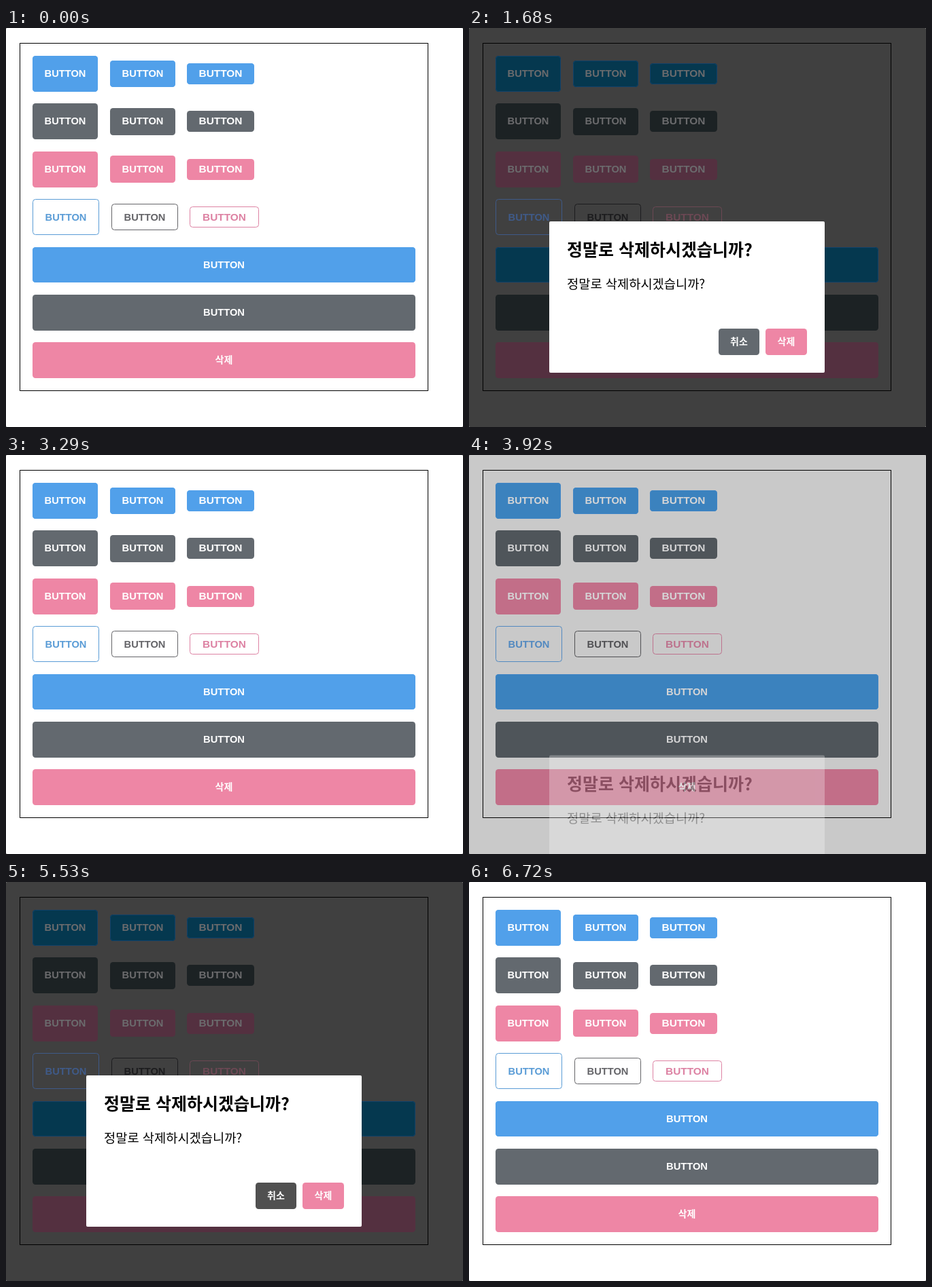
An HTML page for the animation above (6790 ms loop, 672 by 588 pixels).

```html
<!DOCTYPE html>
<html lang="ko">
<head>
<meta charset="utf-8">
<title>Buttons and dialog</title>
<style>
  html, body { margin: 0; width: 100%; height: 100%; overflow: hidden; background: #888; }
  svg { display: block; width: 672px; height: 588px; }
  text { font: bold 14.67px "Liberation Sans", Arial, sans-serif; text-anchor: middle; }
  .ko { font: bold 14px "Noto Sans CJK KR", "Noto Sans CJK", sans-serif; }
  .title { font-size: 25px; text-anchor: start; }
  .body { font-size: 18.7px; font-weight: 400; text-anchor: start; }
</style>
</head>
<body>
<svg id="stage" viewBox="0 0 672 588"></svg>
<script>
const LOOP = 6790, TICK = 70, SLIDE = 220;

// [normal, dimmed]
const WHITE = ['#ffffff', '#404040'];
const LABEL = ['#ffffff', '#6b6b6d'];
const FILL = {
  blue: ['#51a0ea', '#05384f'],
  gray: ['#63696f', '#1c2224'],
  pink: ['#ee86a5', '#543040'],
};
const EDGE = { ...FILL, blue: ['#51a0ea', '#10416a'] };
const LINE = {
  blue: ['#5a9cd6', '#3f5a88'],
  gray: ['#646468', '#1c1c1e'],
  pink: ['#dd82a3', '#6c4854'],
};
const PINK = { idle: '#ee86a5', hover: '#f4a9c3', down: '#ea6390' };
const GRAY = { idle: '#63696f', hover: '#7f868e', down: '#505050' };

// Dialog fades: [start, duration, opening]
const FADES = [[1560, 120, 1], [3180, 110, 0], [3900, 130, 1], [5580, 120, 0]];
// Pointer states: [time, state]
const REMOVE = [[0, 'idle'], [980, 'hover'], [1540, 'down'], [1610, 'idle'], [3500, 'hover'],
  [3780, 'down'], [3920, 'idle'], [5880, 'hover'], [5950, 'idle']];
const CANCEL = [[0, 'idle'], [2030, 'hover'], [2170, 'idle'], [5040, 'hover'], [5530, 'down']];
const CONFIRM = [[0, 'idle'], [2240, 'hover'], [3150, 'down'], [3360, 'idle']];

const stage = document.getElementById('stage');
const tinted = [];

function add(tag, attrs, parent = stage) {
  const el = document.createElementNS('http://www.w3.org/2000/svg', tag);
  for (const key in attrs) el.setAttribute(key, attrs[key]);
  return parent.appendChild(el);
}

function tint(el, key, pair) {
  const [from, to] = pair.map(hex => [1, 3, 5].map(i => parseInt(hex.slice(i, i + 2), 16)));
  tinted.push({ el, key, from, to });
}

function write(x, y, str, attrs = {}, parent = stage) {
  const el = add('text', { x, y, ...attrs }, parent);
  el.textContent = str;
  return el;
}

function box(x, y, width, height, parent = stage) {
  return add('rect', { x, y, width, height, rx: 4.4 }, parent);
}

function solid(x, y, w, h, name, baseline, size, str = 'BUTTON', cls = '') {
  const rect = box(x, y, w, h);
  tint(rect, 'fill', FILL[name]);
  const edge = add('rect', { x: x + .5, y: y + .5, width: w - 1, height: h - 1, rx: 4, fill: 'none' });
  if (name === 'blue') tint(edge, 'stroke', EDGE.blue);
  const label = write(x + w / 2, baseline, str, { class: cls });
  if (size) label.style.fontSize = size + 'px';
  tint(label, 'fill', LABEL);
  return rect;
}

function outline(x, y, w, h, name, baseline, size) {
  const rect = add('rect', { x: x + .5, y: y + .5, width: w - 1, height: h - 1, rx: 4, fill: 'none' });
  const label = write(x + w / 2, baseline, 'BUTTON');
  label.style.fontSize = size + 'px';
  tint(rect, 'stroke', LINE[name]);
  tint(label, 'fill', LINE[name]);
}

tint(add('rect', { width: 672, height: 588, rx: 2 }), 'fill', WHITE);
add('rect', { x: 20.5, y: 22.5, width: 600, height: 512, fill: 'none', stroke: '#000' });

const names = ['blue', 'gray', 'pink'];
const SMALL = 15.4, BASE = 14.67;
const rowTop = i => 41 + 70.4 * i;

names.forEach((name, i) => {
  const top = rowTop(i), base = Math.floor(top + 31.5);
  const span = (dy, h) => [Math.round(top + dy), Math.round(top + dy + h) - Math.round(top + dy)];
  const [y1, h1] = span(0, 52.8), [y2, h2] = span(6.6, 39.6), [y3, h3] = span(11, 30.8);
  solid(39, y1, 96, h1, name, base, BASE);
  solid(153, y2, 96, h2, name, base, BASE);
  solid(266, y3, 99, h3, name, base, SMALL);
});

outline(39, 252, 98, 53, 'blue', 284, BASE);
outline(155, 259, 98, 39, 'gray', 284, BASE);
outline(270, 263, 102, 31, 'pink', 284, SMALL);

solid(39, 323, 563, 52, 'blue', 354, BASE);
solid(39, 393, 563, 53, 'gray', 424, BASE);
const remove = solid(39, 463, 563, 53, 'pink', 494, 0, '삭제', 'ko');

const dialog = add('g', {});
add('rect', { x: 118, y: 285, width: 405, height: 223, rx: 2, fill: '#fff' }, dialog);
write(144, 336, '정말로 삭제하시겠습니까?', { class: 'ko title' }, dialog);
write(144, 384, '정말로 삭제하시겠습니까?', { class: 'ko body' }, dialog);
const cancel = box(367, 443, 60, 39, dialog);
const confirmBtn = box(436, 443, 61, 39, dialog);
write(397, 467, '취소', { class: 'ko', fill: '#fff' }, dialog);
write(466.5, 467, '삭제', { class: 'ko', fill: '#fff' }, dialog);

const easeOut = p => 1 - (1 - p) ** 2;

function openness(t) {
  let k = 0;
  for (const [start, length, opening] of FADES) {
    if (t < start) break;
    const p = easeOut(Math.min(1, (t - start) / length));
    k = opening ? p : 1 - p;
  }
  return k;
}

function stateAt(steps, t) {
  return steps.filter(step => step[0] <= t).pop()[1];
}

function draw(t) {
  const k = openness(t);
  for (const { el, key, from, to } of tinted) {
    el.setAttribute(key, `rgb(${from.map((v, i) => Math.round(v + (to[i] - v) * k))})`);
  }
  const state = stateAt(REMOVE, t);
  if (state !== 'idle') remove.setAttribute('fill', PINK[state]);
  cancel.setAttribute('fill', GRAY[stateAt(CANCEL, t)]);
  confirmBtn.setAttribute('fill', PINK[stateAt(CONFIRM, t)]);
  dialog.setAttribute('opacity', k);
  dialog.setAttribute('transform', `translate(0 ${SLIDE * (1 - k)})`);
}

function loop() {
  draw(Math.floor((performance.now() % LOOP) / TICK) * TICK);
  requestAnimationFrame(loop);
}
loop();
</script>
</body>
</html>
```
